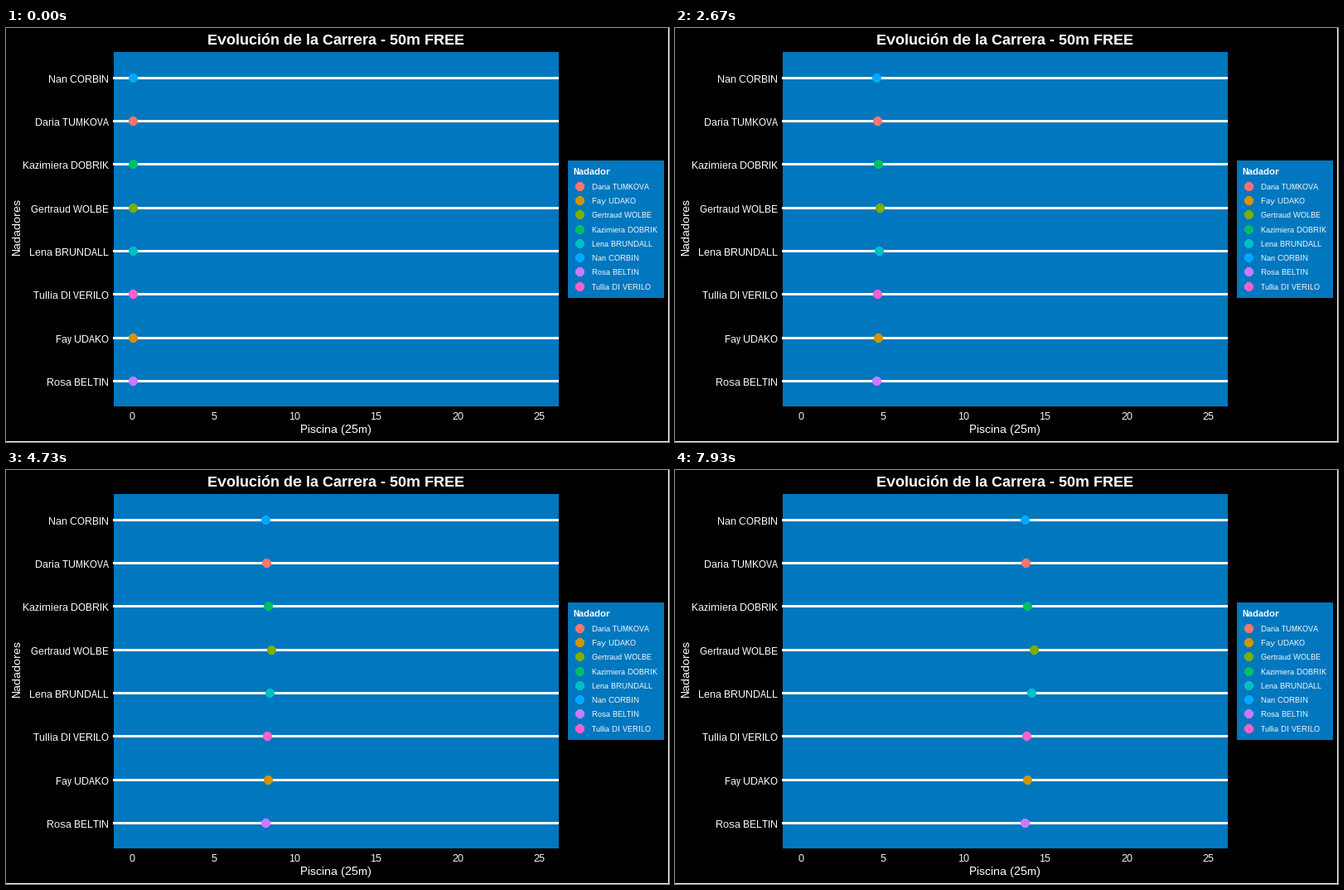
Animation, 800 px wide and 500 px high, one loop 8 s. Source, as a matplotlib script:

```python
import matplotlib.pyplot as plt
from matplotlib.animation import FuncAnimation
from matplotlib.patches import Circle, Rectangle

plt.rcParams.update({
    "font.family": "Liberation Sans",
    "text.hinting": "native",
    "text.hinting_factor": 1,
    "toolbar": "None",
})

WIDTH, HEIGHT, DPI = 800, 500, 100
TICK_MS, LOOP_MS = 20, 8000
STEPS_PER_TICK = 0.3   # the swimmers advance 15 times a second
POOL = "#0077BE"
START_X = 153          # pixel column of 0 m
PX_PER_M = 19.62
RADIUS = 4.85          # fills 11 pixels, as every touched pixel is painted

# lane order, top to bottom: name, colour, speed in pixels per step
SWIMMERS = [
    ("Nan CORBIN", "#00A9FF", 2.2585),
    ("Daria TUMKOVA", "#F8766D", 2.269),
    ("Kazimiera DOBRIK", "#00BE67", 2.289),
    ("Gertraud WOLBE", "#7CAE00", 2.3545),
    ("Lena BRUNDALL", "#00BFC4", 2.325),
    ("Tullia DI VERILO", "#FF61CC", 2.278),
    ("Fay UDAKO", "#CD9600", 2.289),
    ("Rosa BELTIN", "#C77CFF", 2.2585),
]

fig = plt.figure(figsize=(WIDTH / DPI, HEIGHT / DPI), dpi=DPI, facecolor="black")
ax = fig.add_axes([0, 0, 1, 1])
ax.set_xlim(0, WIDTH)
ax.set_ylim(HEIGHT, 0)
ax.axis("off")


def box(x0, y0, x1, y1, color):
    ax.add_patch(Rectangle((x0, y0), x1 - x0, y1 - y0, color=color, lw=0))


def dot(col, row, color):
    return ax.add_patch(Circle((col + 0.5, row + 0.5), RADIUS, facecolor=color,
                               lw=0, antialiased=False, zorder=3))


def label(x, y, text, px, ha="left", **kw):
    ax.text(x, y, text, color="white", fontsize=px * 72 / DPI,
            ha=ha, va="baseline", **kw)


# thin white edge at the right and bottom of the stage
box(WIDTH - 1, 0, WIDTH, HEIGHT, "white")
box(0, HEIGHT - 1, WIDTH, HEIGHT, "white")

# pool, lanes and swimmers
box(130, 29, 667, 457, POOL)
dots = []
for i, (name, color, _) in enumerate(SWIMMERS):
    row = int(60.3 + 52.3 * i)
    box(129, row - 1, 667, row + 2, "white")
    label(124, row + 6, name, 12, ha="right")
    dots.append(dot(START_X, row, color))

# title and axes
label(398, 20, "Evolución de la Carrera - 50m FREE", 18, ha="center", weight="bold")
for metres in range(0, 26, 5):
    label(START_X - 0.5 + PX_PER_M * metres, 473, str(metres), 12, ha="center")
label(398, 489, "Piscina (25m)", 14, ha="center")
label(17, 240, "Nadadores", 14, ha="center", rotation=90, rotation_mode="anchor")

# legend, sorted by name
box(678, 160, 794, 326, POOL)
label(684, 177, "Nadador", 11, weight="bold")
for i, (name, color, _) in enumerate(sorted(SWIMMERS)):
    row = int(191.3 + 17.28 * i)
    dot(692, row, color)
    label(707, row + 4, name, 9.4)


def update(tick):
    step = int((tick + 0.67) * STEPS_PER_TICK)
    for mark, (_, _, speed) in zip(dots, SWIMMERS):
        col = START_X + int(speed * step + 0.5)
        mark.center = (col + 0.5, mark.center[1])
    return dots


anim = FuncAnimation(fig, update, frames=LOOP_MS // TICK_MS, interval=TICK_MS,
                     repeat=True, repeat_delay=0, blit=False)
plt.show()
```
